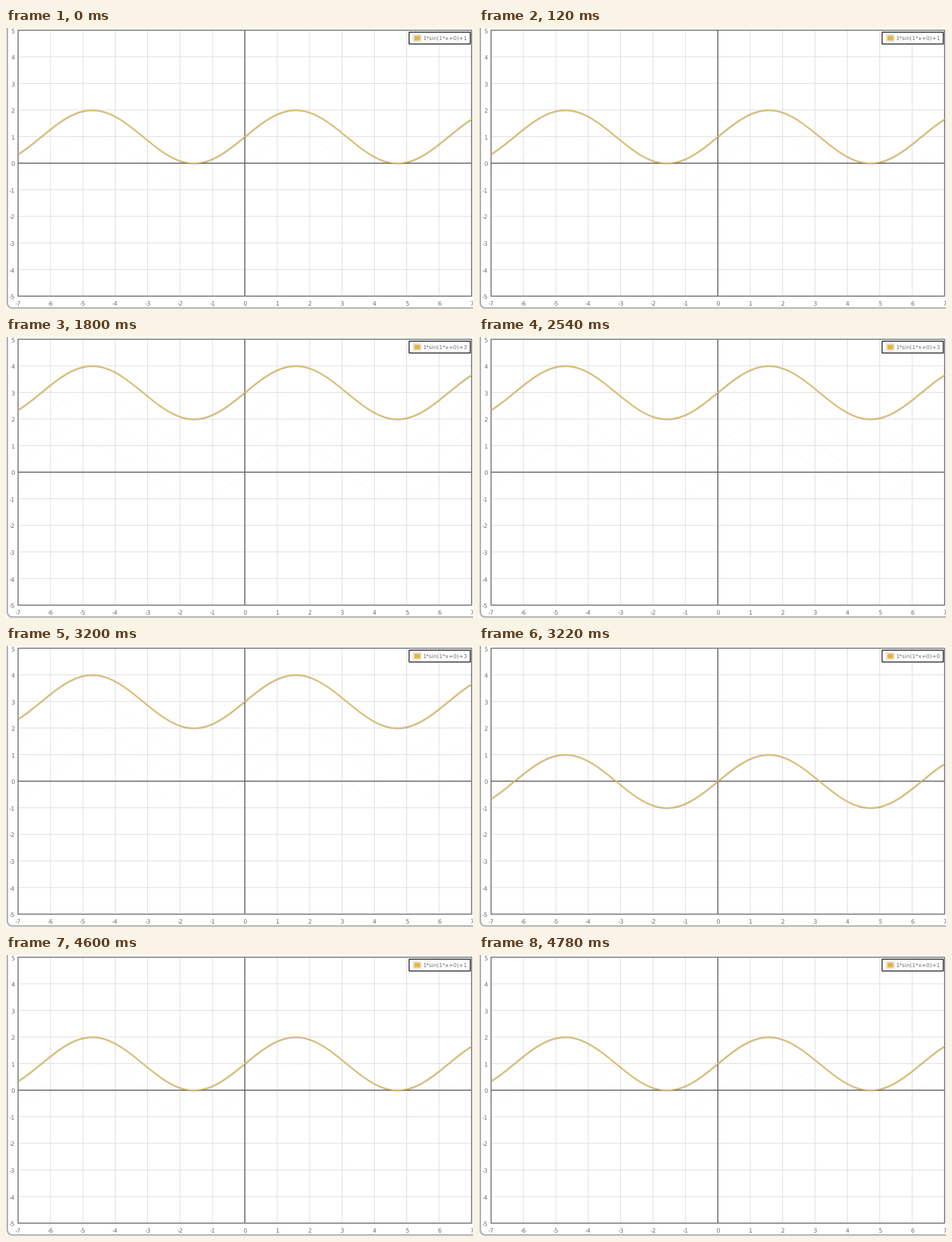
Animation of 694 by 418 pixels, one loop 5.34 s. Source, as a matplotlib script:

```python
import matplotlib.pyplot as plt
import numpy as np
from matplotlib.animation import FuncAnimation
from matplotlib.patches import FancyBboxPatch, Rectangle

W, H = 694, 418
LOOP, STEP = 5340, 20
FONT = "DejaVu Sans"
INK = "#6e6e6e"
SHADOW = (0.4, 0.8, 1.2)

# (start in ms, vertical shift of the sine)
SHIFTS = [(0, 1), (400, 2), (1800, 3), (3220, 0), (4600, 1)]

# Soft, unsnapped edges like a scaled canvas
plt.rcParams.update({"path.snap": False, "text.hinting": "none"})


def px(x):
    return 354.9 + 48.14 * x


def py(y):
    return 201.1 - 39.55 * y


# One point equals one pixel at 72 dpi
fig = plt.figure(figsize=((W + 0.01) / 72, (H + 0.01) / 72), dpi=72, facecolor="white")
ax = fig.add_axes([0, 0, 1, 1])
ax.set_xlim(0, W)
ax.set_ylim(H, 0)
ax.axis("off")


def line(xs, ys, color, width, z):
    return ax.plot(xs, ys, color=color, lw=width, zorder=z, solid_capstyle="butt")[0]


def label(x, y, s, size=8.6, **kw):
    return ax.text(x, y, s, fontname=FONT, fontsize=size, color=INK,
                   va="center_baseline", **kw)


def box(x0, y0, x1, y1, fill, edge, width, z):
    ax.add_patch(Rectangle((x0, y0), x1 - x0, y1 - y0, fc=fill, ec=edge, lw=width, zorder=z))


def draw_panel():
    """White card with a soft shadow on the left and bottom edges."""
    for grow, shade in ((3, "#e2e2e2"), (2, "#c4c4c4"), (1, "#9a9a9a"), (0, "white")):
        ax.add_patch(FancyBboxPatch(
            (3 - grow, -20), W + 30, 435.5 + grow, fc=shade, ec="none",
            boxstyle=f"round,pad=0,rounding_size={7 + grow}", zorder=0))


def draw_grid():
    left, right, top, bottom = px(-7), px(7), py(5), py(-5)
    for i in range(-7, 8):
        if abs(i) < 7 and i:
            line([px(i)] * 2, [top, bottom], "#dedede", 1, 1)
        label(px(i), 409.7, str(i), ha="center")
    for j in range(-5, 6):
        if abs(j) < 5 and j:
            line([left, right], [py(j)] * 2, "#dedede", 1, 1)
        label(13, py(j) + 0.8, str(j), ha="right")
    line([px(0)] * 2, [top, bottom], "#606060", 1.5, 2)
    line([left, right], [py(0)] * 2, "#606060", 1.5, 2)
    box(left, top, right, bottom, "none", "#777777", 1.6, 2)


def draw_legend():
    box(599, 6.3, 689.9, 23.8, "white", "#222222", 1.4, 6)
    box(605, 10.3, 616.5, 19.3, "white", "#d2d2d2", 1, 7)
    box(606.6, 11.5, 615.6, 18.5, "#e8b440", "none", 0, 8)
    return label(619.5, 15.3, "", 8.3, ha="left", zorder=8)


draw_panel()
draw_grid()
formula = draw_legend()

xs = np.linspace(-7, 7, 600)
wave = np.sin(xs)
ghosts = [line(px(xs), py(wave + k), "#fbfbfb", 1.2, 0.5) for k in range(3)]
shadows = [line(px(xs) + d * 0.4, py(wave) + d, (0, 0, 0, 0.1), 1.9, 3) for d in SHADOW]
curve = line(px(xs), py(wave), "#e6c067", 1.8, 4)


def update(i):
    t = i * STEP
    shift = [s for start, s in SHIFTS if t >= start][-1]
    y = py(wave + shift)
    curve.set_ydata(y)
    for d, shadow in zip(SHADOW, shadows):
        shadow.set_ydata(y + d)
    for k, ghost in enumerate(ghosts):
        ghost.set_visible(k < shift)
        ghost.set_alpha(0.5 if k and 2780 <= t < 3220 else 1)
    formula.set_text(f"1*sin(1*x+0)+{shift}")
    return [curve, formula, *shadows, *ghosts]


anim = FuncAnimation(fig, update, frames=LOOP // STEP, interval=STEP,
                     repeat=True, repeat_delay=0, blit=False)
plt.show()
```
